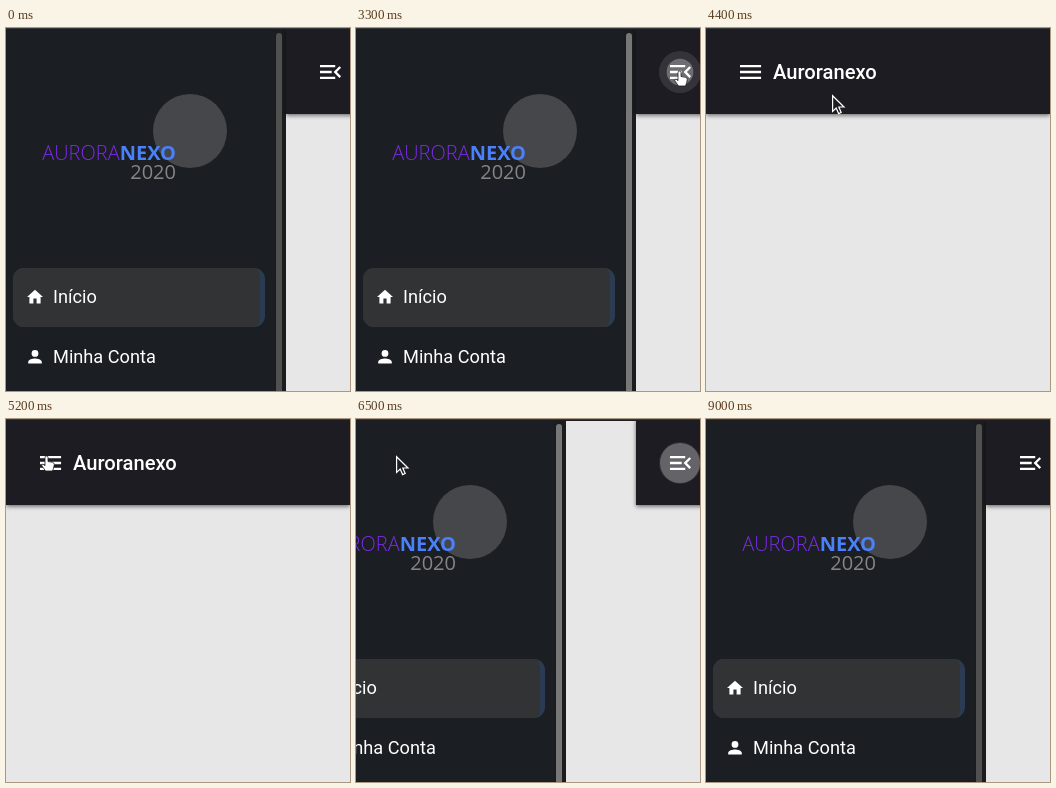
An HTML page for the animation above (9300 ms loop, 344x363 px).

```html
<!DOCTYPE html>
<html lang="pt">
<head>
<meta charset="utf-8">
<title>Menu lateral</title>
<style>
  html, body { margin: 0; width: 100%; height: 100%; overflow: hidden; background: #e7e7e7; }
  svg { display: block; width: 344px; height: 363px; }
  text { font-family: Roboto, sans-serif; fill: #fff; }
  .brand { font-family: "Open Sans", sans-serif; font-size: 20px; text-anchor: end; }
  .item { font-size: 18.2px; }
</style>
</head>
<body>
<svg viewBox="0 0 344 363">
  <defs>
    <filter id="shade" x="-5%" y="-10%" width="110%" height="130%">
      <feDropShadow dx="0" dy="1.5" stdDeviation="2" flood-opacity=".55"/>
    </filter>
  </defs>
  <rect width="344" height="363" fill="#e7e7e7"/>

  <g id="drawer">
    <rect width="280" height="363" fill="#1b1e22"/>
    <rect x="268" width="12" height="363" fill="#1b1c1e"/>
    <rect id="thumb" x="270" y="5" width="6" height="370" rx="3"/>
    <circle cx="184" cy="103" r="37" fill="#45474a"/>
    <text class="brand" x="170" y="132"><tspan font-weight="300" fill="#7a2be6">AURORA</tspan><tspan font-weight="700" fill="#4a80fa">NEXO</tspan></text>
    <text class="brand" x="170" y="151" style="fill:#858585">2020</text>
    <rect x="7" y="240" width="252" height="59" rx="11" fill="#2b3b52"/>
    <path d="M18 240H248Q254 240 254 251V288Q254 299 248 299H18A11 11 0 0 1 7 288V251A11 11 0 0 1 18 240Z" fill="#323335"/>
    <path transform="translate(19.4 259.4) scale(.8)" fill="#fff" d="M10 20v-6h4v6h5v-8h3L12 3 2 12h3v8z"/>
    <text class="item" x="47" y="275">Início</text>
    <path transform="translate(18.8 318.6) scale(.85)" fill="#fff" d="M12 12a4 4 0 1 0 0-8 4 4 0 0 0 0 8zm0 2c-2.67 0-8 1.34-8 4v2h16v-2c0-2.66-5.33-4-8-4z"/>
    <text class="item" x="47" y="335">Minha Conta</text>
  </g>

  <g id="header">
    <rect width="344" height="86" fill="#1b1f23" filter="url(#shade)"/>
    <circle id="hover" cx="44" cy="44" r="21" fill="#fff"/>
    <circle id="ripple" cx="44" cy="44" fill="#fff"/>
    <g transform="translate(30.5 30) scale(1.17)" fill="#fff">
      <path id="menuIcon" d="M3 18h18v-2H3zM3 13h18v-2H3zM3 6v2h18V6z"/>
      <path id="closeIcon" d="M3 18h13v-2H3zM3 6v2h13V6zM3 13h10v-2H3zM21 15.59 17.42 12 21 8.41 19.59 7l-5 5 5 5z"/>
    </g>
    <text x="67" y="51" font-size="20.2" font-weight="500">Auroranexo</text>
  </g>

  <rect width="344" height="2" fill="#1b1e22"/>
  <rect width="344" height="1" fill="#34383b"/>

  <g id="cursor">
    <path id="arrow" d="M.6 .8V16.4L4.2 13 6.6 18.6 9.2 17.5 6.8 12H12Z" fill="#1b1d20" stroke="#fff" stroke-width="1.2"/>
    <path id="hand" d="M-1 8V1.5a1.5 1.5 0 0 1 3 0V5.5L6.5 6.3Q8.3 6.8 8.3 8.6L7.6 12 6.5 15H-.4L-4.2 9.8Q-4.6 8 -3 8.1L-1 9.6Z" fill="#fff" stroke="#1b1d20" stroke-width=".8"/>
  </g>
</svg>
<script>
const LOOP = 9300, STEP = 100, WIDTH = 280;
const $ = id => document.getElementById(id);
const show = (id, on) => $(id).setAttribute('visibility', on ? 'visible' : 'hidden');
const move = (id, x, y) => $(id).setAttribute('transform', `translate(${x} ${y})`);

// Linear interpolation over [time, value...] keys
function track(keys, t) {
  if (t <= keys[0][0]) return keys[0].slice(1);
  const i = keys.findIndex(k => k[0] > t);
  if (i < 0) return keys[keys.length - 1].slice(1);
  const a = keys[i - 1], b = keys[i], p = (t - a[0]) / (b[0] - a[0]);
  return a.slice(1).map((v, n) => v + (b[n + 1] - v) * p);
}

const pointer = [
  [200, 346, 225], [300, 338, 206], [700, 324, 145], [1200, 311, 72],
  [1500, 318, 50], [1700, 323, 43], [3300, 323, 43], [3500, 320, 43],
  [3900, 320, 43], [4000, 314, 44], [4200, 236, 53], [4400, 126, 67],
  [4600, 82, 85], [4900, 63, 53], [5200, 40, 37],
  [6600, 40, 37], [7000, 63, 10], [7200, 63, 7], [7500, 63, 7], [7900, 50, -22]
];
const slide = [
  [3400, 0], [3500, -40], [3600, -145], [3700, -255], [3800, -WIDTH],
  [6300, -WIDTH], [6400, -209], [6500, -70], [6600, -10], [6700, 0]
];
const hoverAlpha = [
  [1300, 0], [1600, .1], [3400, .1], [3500, 0],
  [6200, 0], [6300, .08], [6500, .08], [6700, 0]
];
// radius, opacity
const ripple = [
  [3100, 0, .29], [3400, 20, .29], [3600, 20, .29], [3800, 20, 0],
  [6200, 0, .26], [6400, 14, .26], [6500, 20, .26], [6700, 20, 0]
];

function draw(time) {
  const t = Math.floor(time % LOOP / STEP) * STEP;
  const open = t < 3500 || t >= 6400;
  const left = open ? WIDTH : 0;

  move('drawer', track(slide, t)[0], 0);
  $('thumb').setAttribute('fill', t >= 3200 && t < 9000 ? '#777' : '#505050');

  move('header', left, 0);
  show('menuIcon', !open);
  show('closeIcon', open);
  $('hover').setAttribute('opacity', track(hoverAlpha, t)[0]);
  const [radius, alpha] = track(ripple, t);
  const rippling = t < 3800 || t >= 6300;
  $('ripple').setAttribute('r', radius);
  $('ripple').setAttribute('opacity', rippling ? alpha : 0);

  const [x, y] = track(pointer, t);
  const onButton = Math.hypot(x - left - 44, y - 44) < 21;
  move('cursor', x, y);
  show('cursor', t >= 300 && t < 7900);
  $('arrow').setAttribute('opacity', onButton ? 0 : 1);
  $('hand').setAttribute('opacity', onButton ? 1 : 0);
}

const start = performance.now();
function tick() {
  draw(performance.now() - start);
  requestAnimationFrame(tick);
}
tick();
</script>
</body>
</html>
```
